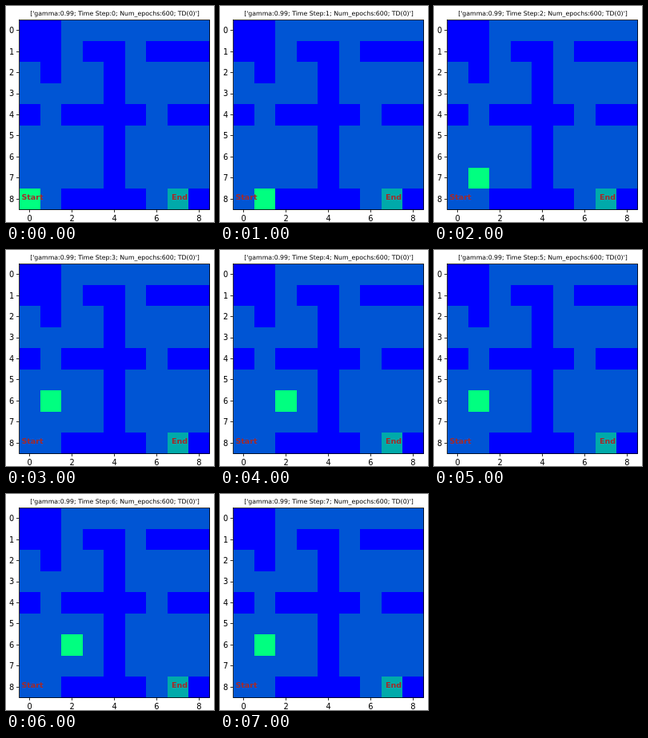
Animation of 260x271 px, one loop 8 s. Source, as an HTML page with a canvas:

```html
<!DOCTYPE html>
<html lang="en">
<head>
<meta charset="utf-8">
<title>Grid walk</title>
<style>
  html, body { margin: 0; width: 100%; height: 100%; overflow: hidden; background: #fff; }
  canvas { display: block; }
</style>
</head>
<body>
<canvas id="stage" width="260" height="271"></canvas>
<script>
const ctx = document.getElementById('stage').getContext('2d');

const STEP_MS = 1000;
const LEFT = 16.5, TOP = 17.5, SIDE = 238, COUNT = 9, CELL = SIDE / COUNT;
const COLORS = { wall: '#0000ff', floor: '#0055d4', goal: '#00aaaa', agent: '#00ff80' };

const MAZE = [
  '##.......',
  '##.##.###',
  '.#..#....',
  '....#....',
  '#.####.##',
  '....#....',
  '....#....',
  '....#....',
  '..####.G#'
];

// Agent position [column, row] at each time step
const PATH = [[0, 8], [1, 8], [1, 7], [1, 6], [2, 6], [1, 6], [2, 6], [1, 6]];

function fillCell(col, row, color) {
  const x = Math.round(LEFT + col * CELL), y = Math.round(TOP + row * CELL);
  const right = Math.round(LEFT + (col + 1) * CELL);
  const bottom = Math.round(TOP + (row + 1) * CELL);
  ctx.fillStyle = color;
  ctx.fillRect(x, y, right - x, bottom - y);
}

function label(text, x, y, size, color = '#000', weight = 'normal') {
  ctx.font = `${weight} ${size}px "DejaVu Sans", sans-serif`;
  ctx.fillStyle = color;
  ctx.textAlign = 'center';
  ctx.fillText(text, x, y);
}

function drawAxes() {
  ctx.strokeStyle = '#000';
  ctx.lineWidth = 0.8;
  ctx.strokeRect(LEFT, TOP, SIDE, SIDE);
  ctx.beginPath();
  for (let i = 0; i < COUNT; i++) {
    const offset = (i + 0.5) * CELL;
    const y = Math.floor(TOP + offset) + 0.5;
    ctx.moveTo(LEFT - 3.5, y);
    ctx.lineTo(LEFT, y);
    label(i, 7, Math.round(TOP + offset + 3.4), 9.8);
    if (i % 2 === 0) {
      const x = Math.floor(LEFT + offset) + 0.5;
      ctx.moveTo(x, TOP + SIDE);
      ctx.lineTo(x, TOP + SIDE + 3.5);
      label(i, LEFT + offset, 270, 9.8);
    }
  }
  ctx.stroke();
}

function draw(step) {
  ctx.fillStyle = '#fff';
  ctx.fillRect(0, 0, 260, 271);
  MAZE.forEach((line, row) => [...line].forEach((kind, col) => {
    const name = { '#': 'wall', '.': 'floor', G: 'goal' }[kind];
    fillCell(col, row, COLORS[name]);
  }));
  fillCell(...PATH[step], COLORS.agent);
  drawAxes();
  label('Start', 33, 243, 9.5, '#a52a2a', 'bold');
  label('End', 217, 243, 9.5, '#a52a2a', 'bold');
  label(`['gamma:0.99; Time Step:${step}; Num_epochs:600; TD(0)']`, 136, 12, 7.8);
}

function tick() {
  draw(Math.floor(performance.now() / STEP_MS) % PATH.length);
  requestAnimationFrame(tick);
}
tick();
</script>
</body>
</html>
```
